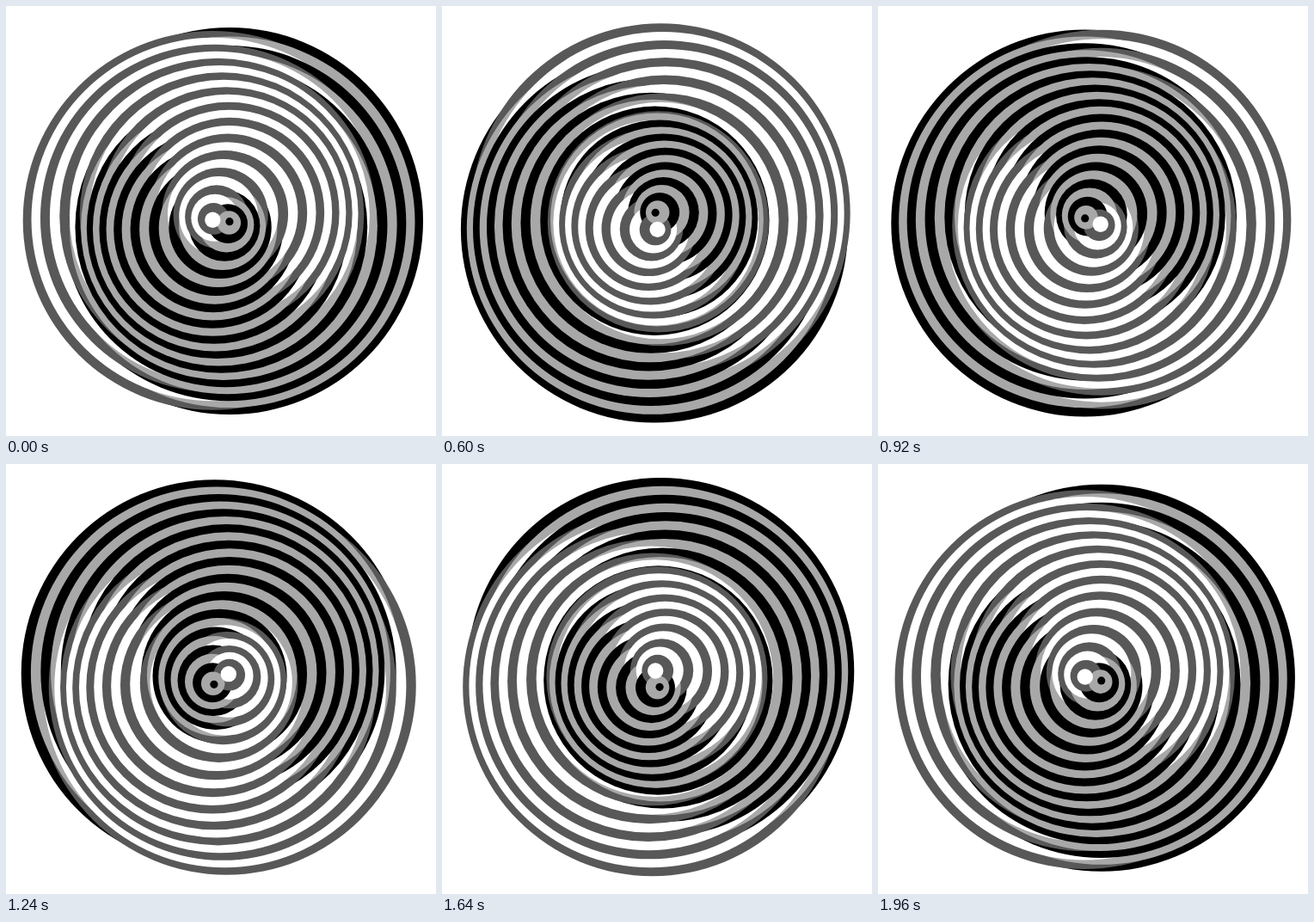
Recreate the animation shown at these times as an HTML page with a canvas. Size 500 by 500 pixels, loop 2000 ms.

```html
<!DOCTYPE html>
<html>
<head>
<meta charset="utf-8">
<style>
html, body { margin: 0; width: 100%; height: 100%; overflow: hidden; background: #fff; }
canvas { display: block; }
</style>
</head>
<body>
<canvas id="stage" width="500" height="500"></canvas>
<script>
const ctx = document.getElementById('stage').getContext('2d');
const TAU = Math.PI * 2;
const LOOP = 2000, STEP = 40;
const COUNT = 49, RADIUS = 225, SWING = 10;
const SHADES = ['#000', '#585858', '#a8a8a8', '#fff'];

// Nested discs; neighbours swing to opposite sides, with a lag growing inwards.
function draw(time) {
  const turn = TAU * time / LOOP;
  ctx.fillStyle = '#fff';
  ctx.fillRect(0, 0, 500, 500);
  for (let i = 0; i < COUNT; i++) {
    const depth = i / COUNT;
    const lag = TAU * depth;
    const swing = i % 2 ? -SWING : SWING;
    const x = 250 + swing * Math.cos(turn + lag);
    const y = 250 + swing * Math.sin(turn + lag / 2);
    ctx.fillStyle = SHADES[i % 4];
    ctx.beginPath();
    ctx.arc(x, y, RADIUS * (1 - depth), 0, TAU);
    ctx.fill();
  }
}

const start = performance.now();
function tick() {
  const time = (performance.now() - start) % LOOP;
  draw(Math.floor(time / STEP) * STEP);
  requestAnimationFrame(tick);
}
tick();
</script>
</body>
</html>
```
